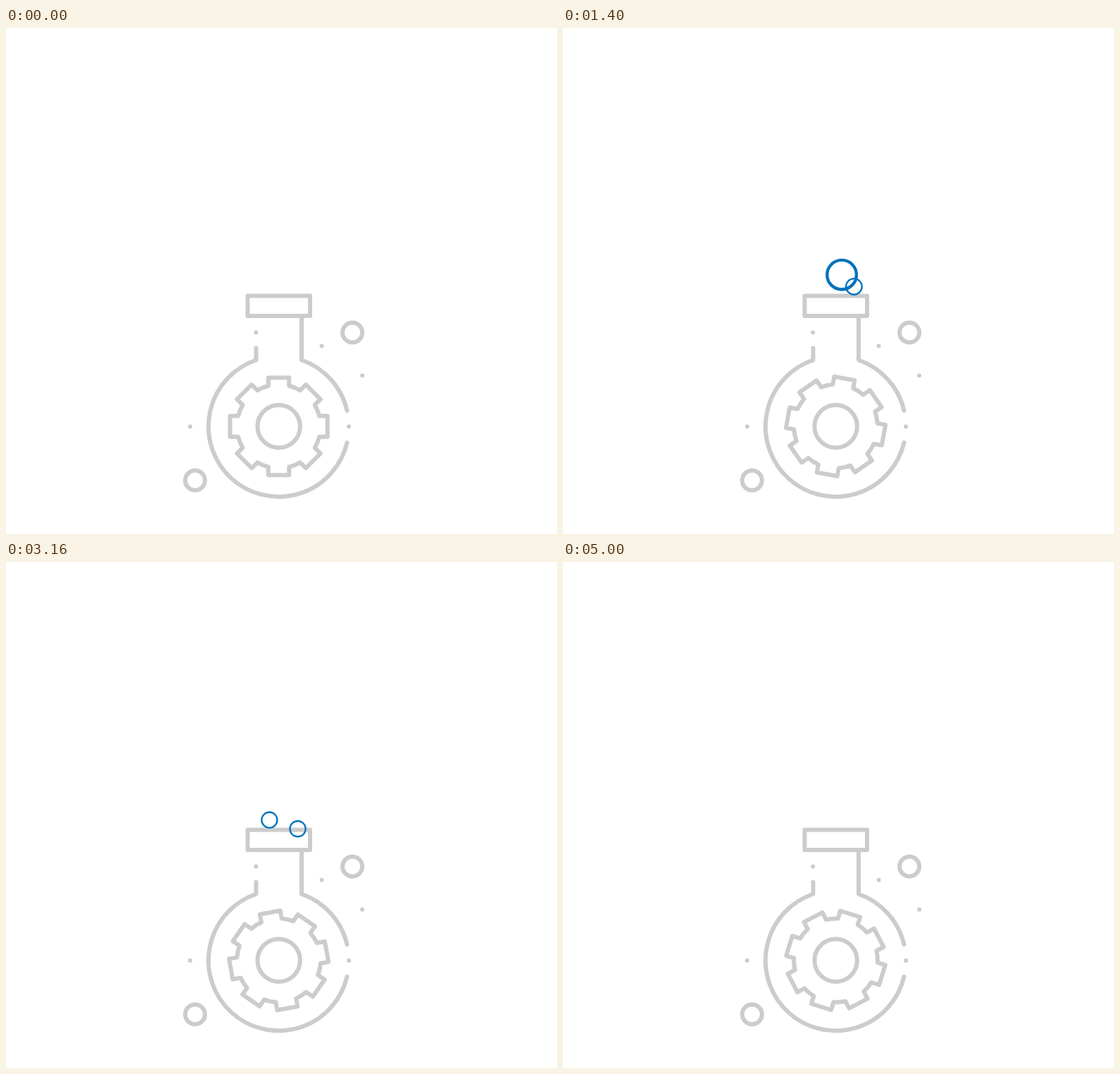
Write an HTML page that moves like this. It is 781 px wide and 717 px high and loops after 5.04 s.

```html
<!DOCTYPE html>
<html lang="en">
<head>
<meta charset="utf-8">
<title>Bubbling flask</title>
<style>
  html, body { margin: 0; width: 100%; height: 100%; overflow: hidden; background: #fff; }
  svg { display: block; width: 781px; height: 717px; }
</style>
</head>
<body>
<svg viewBox="0 0 781 717" fill="none" stroke="#ccc" stroke-width="6" stroke-linecap="round" stroke-linejoin="round">
  <path d="M342.5 379.5H431V408H342.5Z"/>
  <path d="M419 408V470.5A99.5 99.5 0 0 1 483.4 542M483.4 587.5A99.5 99.5 0 1 1 354.5 470.5V453.5"/>
  <path d="M354.3 431.5h0M447.5 450.5h0M505 492.5h0M486 564.8h0M261 564.8h0"/>
  <circle cx="491" cy="431.5" r="14"/>
  <circle cx="268" cy="641" r="14"/>
  <circle cx="386.7" cy="564.5" r="30.2"/>
  <path id="gear"/>
  <g id="bubbles" stroke="#0072bc"></g>
</svg>
<script>
const STEP = 40, STEPS = 126, LIFE = 25;
const GEAR_TURN = 1.579; // degrees per step

// Paths a bubble can take out of the neck: start, end, final size
const big = { x0: 399.2, x1: 383.4, y1: 238.5, size: 1 };
const left = { x0: 375.7, x1: 372.8, y1: 359.5, size: 0.46 };
const right = { x0: 414.5, x1: 411.8, y1: 359.5, size: 0.47 };
const START_Y = 388.2;

const bubbles = [
  [big, -0.9], [left, 9.7], [right, 18], [big, 26.7], [left, 34.7],
  [big, 50.1], [left, 61.4], [right, 69], [big, 80], [left, 94.5]
].map(([path, start]) => {
  const el = document.createElementNS("http://www.w3.org/2000/svg", "circle");
  document.getElementById("bubbles").append(el);
  return { path, start, el };
});

const clamp = v => Math.min(1, Math.max(0, v));
const smooth = v => { v = clamp(v); return v * v * (3 - 2 * v); };
const mix = (a, b, p) => a + (b - a) * p;

function gearPath() {
  const tooth = [[-14.7, -57.5], [-14.7, -69], [14.7, -69], [14.7, -57.5]];
  let d = "";
  for (let k = 0; k < 8; k++) {
    const c = Math.cos(k * Math.PI / 4), s = Math.sin(k * Math.PI / 4);
    tooth.forEach(([x, y], i) => {
      const command = i ? "L" : k ? "A59.4 59.4 0 0 1 " : "M";
      d += command + (x * c - y * s).toFixed(2) + " " + (x * s + y * c).toFixed(2);
    });
  }
  return d + "A59.4 59.4 0 0 1 -14.7 -57.5Z";
}

const gear = document.getElementById("gear");
gear.setAttribute("d", gearPath());

function set(el, attributes) {
  for (const name in attributes) el.setAttribute(name, attributes[name]);
}

function draw() {
  const step = Math.floor(performance.now() / STEP) % STEPS;
  set(gear, { transform: `translate(386.6 564.5) rotate(${step * GEAR_TURN})` });
  for (const { path, start, el } of bubbles) {
    const t = (step - start) / LIFE;
    const p = smooth(t), grow = smooth(t / 0.43);
    const scale = grow * path.size;
    set(el, {
      cx: mix(path.x0, path.x1, p),
      cy: mix(START_Y, path.y1, p),
      r: 24 * scale,
      "stroke-width": 5 * scale,
      opacity: grow < 0.05 ? 0 : clamp((0.95 - t) / 0.13)
    });
  }
  requestAnimationFrame(draw);
}
draw();
</script>
</body>
</html>
```
